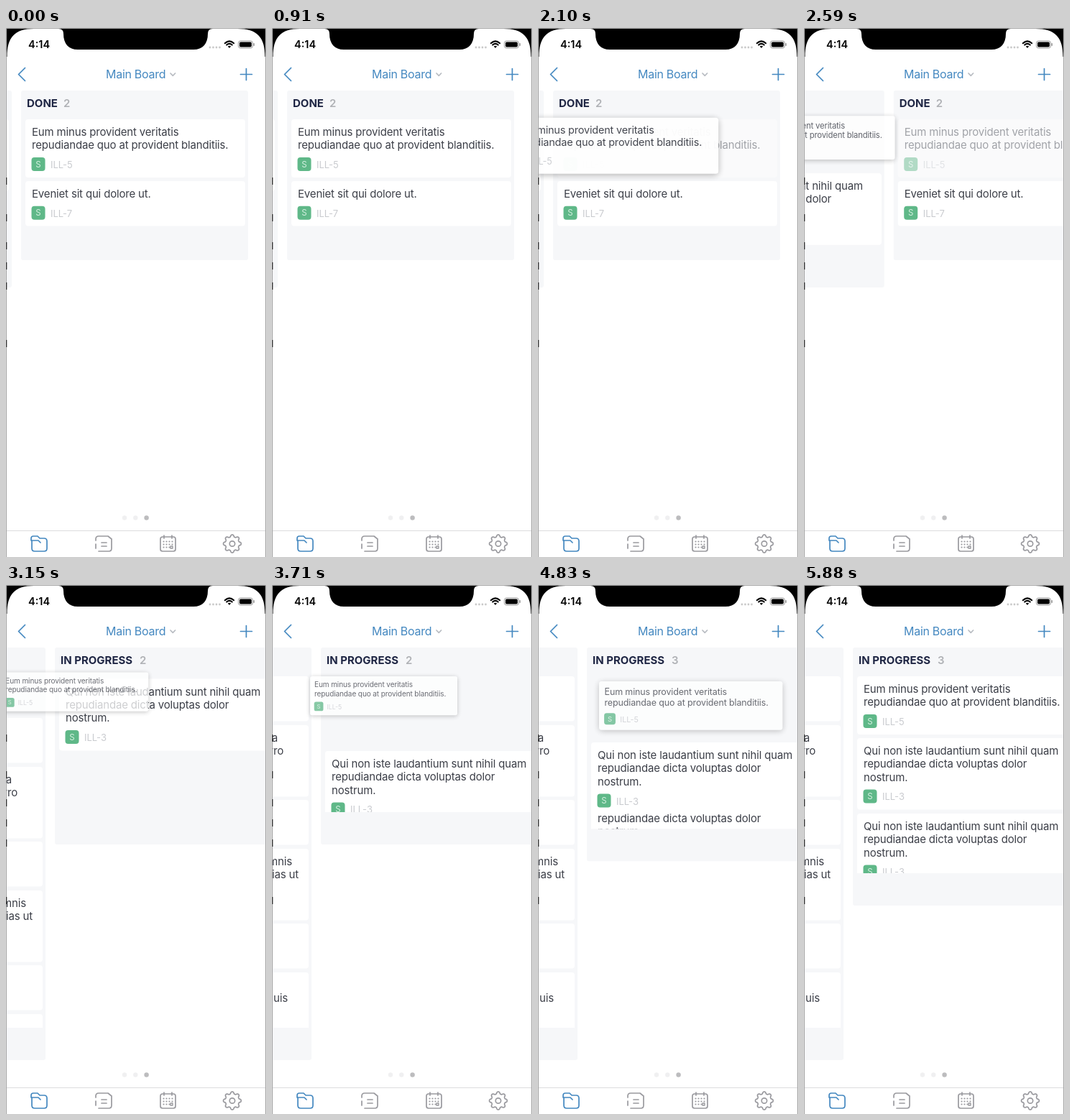
An HTML page for the animation above (5.95 s loop, 362 px wide and 736 px high).

```html
<!DOCTYPE html>
<html lang="en">
<head>
<meta charset="utf-8">
<title>Board</title>
<style>
  html, body { margin: 0; width: 100%; height: 100%; overflow: hidden; background: #fff; }
  svg { display: block; }
  text { font-family: Inter, "Liberation Sans", sans-serif; white-space: pre; }
  .body { font-size: 15px; letter-spacing: -.17px; fill: #3c3f48; }
  .key { font-size: 13px; fill: #c9cbcf; }
  .badge { font-size: 11.5px; fill: #d3efdf; text-anchor: middle; }
  .head { font-size: 15px; font-weight: 700; fill: #1f2644; }
  .count { font-size: 15px; font-weight: 600; fill: #b0b2b6; }
  .title { font-size: 16px; letter-spacing: -.28px; fill: #4488c0; }
  .clock { font-size: 14.5px; font-weight: 600; }
  .line { fill: none; stroke-linecap: round; stroke-linejoin: round; }
</style>
</head>
<body>
<svg id="stage" width="362" height="736" viewBox="0 0 362 736"></svg>
<script>
const LOOP = 5950, STEP = 70, PITCH = 329, TOP = 127, INSET = 6;
const BLUE = '#4488c0', GRAY = '#9a9a9f';
const stage = document.getElementById('stage');

const rect = (x, y, w, h, fill, rx = 0, extra = '') =>
  `<rect x="${x}" y="${y}" width="${w}" height="${h}" rx="${rx}" fill="${fill}" ${extra}/>`;
const dot = (x, y, r, fill) => `<circle cx="${x}" cy="${y}" r="${r}" fill="${fill}"/>`;
const text = (x, y, cls, str, extra = '') => `<text x="${x}" y="${y}" class="${cls}" ${extra}>${str}</text>`;
const line = (d, color, width = 1.7) => `<path class="line" d="${d}" stroke="${color}" stroke-width="${width}"/>`;
const at = (x, y, body) => `<g transform="translate(${x} ${y})">${body}</g>`;
const cardHeight = rows => 44 + 18.5 * rows;

function card(lines, key) {
  const rows = lines.length, y = 16.5 + 18.3 * rows;
  return rect(0, 0, 306, cardHeight(rows), '#fff', 4) +
    lines.map((s, i) => text(9, 23 + 18.3 * i, 'body', s)).join('') +
    rect(8.5, y, 19, 19, '#5fb888', 4) + text(18, y + 13.5, 'badge', 'S') +
    text(35, y + 15, 'key', key);
}

// Only the line ends of the leftmost column reach the screen: one-row and three-row cards alternate.
function tailCards() {
  const tails = [['culpa', 263, 'porro', 271], ['omnis', 283, 'alias ut', 292], ['', 0, 'quis', 277]];
  const tail = (s, end, i) => text(end, 23 + 18.3 * i, 'body', s, 'text-anchor="end"');
  return tails.map(([a, endA, b, endB], n) => at(INSET, TOP + 172 * n,
    rect(0, 0, 306, cardHeight(1), '#fff', 4) +
    at(0, 68, rect(0, 0, 306, cardHeight(3), '#fff', 4) + tail(a, endA, 0) + tail(b, endB, 1)))).join('');
}

function column(id, bottom, title, countX, cards) {
  return `<g id="${id}">` + rect(0, 87, 316, bottom - 87, '#f6f7f9', 3, `id="${id}Back"`) +
    text(8, 110, 'head', title) + text(countX, 110, 'count', title && 2, `id="${id}Count"`) +
    `<clipPath id="${id}Clip">${rect(0, 124, 316, bottom - 169, '#000', 0, `id="${id}Window"`)}</clipPath>` +
    `<g clip-path="url(#${id}Clip)">${cards}</g></g>`;
}

function gear(cx, cy) {
  const points = Array.from({ length: 96 }, (_, i) => {
    const a = i / 48 * Math.PI, r = 11 + 1.5 * Math.tanh(1.6 * Math.cos(8 * a));
    return [cx + r * Math.cos(a), cy + r * Math.sin(a)].map(v => v.toFixed(2)).join(' ');
  });
  return line(`M${points.join('L')}Z`, GRAY) +
    `<circle cx="${cx}" cy="${cy}" r="3.7" fill="none" stroke="${GRAY}" stroke-width="1.7"/>`;
}

function tabBar() {
  const days = Array.from({ length: 11 }, (_, i) => dot(219.5 + i % 4 * 4, 714.5 + (i >> 2) * 4, 1.1, GRAY)).join('');
  return rect(0, 699, 362, 37, '#fff') + rect(0, 699, 362, 1, '#dcdcde') +
    line('M35 713V710Q35 707 38 707H44L47 710H53Q57 710 57 714V724Q57 728 53 728H40Q36 728 36 724V713H45L48 716', BLUE) +
    line('M125 713V711Q125 707 129 707H142L147 711V724Q147 728 143 728H129M125 718V724M133 716H140M133 721H140', GRAY) +
    line('M218 708H233Q236 708 236 711V725Q236 728 233 728H218Q215 728 215 725V711Q215 708 218 708M220 706V710M231 706V710', GRAY) +
    days + line('M229 721H232V724H229Z', GRAY, 1.4) + gear(315, 717.5);
}

function statusBar() {
  const bezel = '<path d="M0 0H362V40H360.5C360.5 13 350 1 322 1H288Q281 1 281 8C281 22 274 30 261 30H100C87 30 80 22 80 8Q80 1 73 1H39C12 1 1.5 13 1.5 40H0Z"/>';
  const signal = [0, 1, 2, 3].map(i => dot(284 + 4.5 * i, 27, 1.4, '#c9c9c9')).join('');
  const wifi = line('M304.8 21.2Q311 15.5 317.2 21.2M307.2 23.6Q311 20.2 314.8 23.6', '#000', 2) +
    '<path d="M308.8 25.6Q311 23.8 313.2 25.6L311 28Z"/>';
  const battery = '<rect x="323.5" y="18" width="20" height="10" rx="3" fill="none" stroke="#999"/>' +
    rect(325, 19.5, 17, 7, '#000', 1.7) + rect(344.5, 21, 1.5, 4, '#999', .7);
  return bezel + text(31, 28, 'clock', '4:14') + signal + wifi + battery;
}

function chrome() {
  const pages = [0, 1, 2].map(i => dot(165 + 15.3 * i, 681.5, 3.2, i < 2 ? '#f0f0f1' : '#bcbcbe')).join('');
  const specks = [213, 264, 303, 331, 359, 439].map(y => rect(0, y - 5, 1.3, 10, '#333')).join('');
  const nav = line('M26.5 55.5L17.5 64.5L26.5 73.5', BLUE) + text(139, 70, 'title', 'Main Board') +
    line('M229 63L232.3 66.3L235.6 63', '#b8bcc2') + line('M326.5 64.5H342.5M334.5 56.5V72.5', BLUE);
  const frame = rect(.5, .5, 361, 740, 'none', 0, 'stroke="#a8a8a8"');
  return pages + tabBar() + statusBar() + frame + specks + nav;
}

const eum = card(['Eum minus provident veritatis', 'repudiandae quo at provident blanditiis.'], 'ILL-5');
const qui = card(['Qui non iste laudantium sunt nihil quam', 'repudiandae dicta voluptas dolor', 'nostrum.'], 'ILL-3');
const eveniet = card(['Eveniet sit qui dolore ut.'], 'ILL-7');

stage.innerHTML =
  '<filter id="blur" x="-20%" y="-40%" width="140%" height="190%"><feGaussianBlur stdDeviation="5"/></filter>' +
  column('todo', 661, '', 0, `<g id="todoList">${tailCards()}</g>`) +
  column('doing', 361, 'IN PROGRESS', 118, `<g id="second">${qui}</g><g id="first">${qui}</g>`) +
  column('done', 323, 'DONE', 59, at(INSET, TOP, `<g opacity=".45">${eum}</g>`) + at(INSET, 213, eveniet)) +
  `<g id="drag">${rect(0, 2, 306, 81, '#000', 5, 'id="shadow" filter="url(#blur)"')}${eum}</g>` +
  chrome();

const el = {};
stage.querySelectorAll('[id]').forEach(node => el[node.id] = node);

function move(node, x, y, scale = 1) {
  node.setAttribute('transform', `translate(${x} ${y}) scale(${scale})`);
}

function render(t) {
  // Eased progress of one phase, from 0 to 1.
  const phase = (start, duration) => {
    const u = Math.min(1, Math.max(0, (t - start) / duration));
    return u * u * (3 - 2 * u);
  };
  const lift = phase(1330, 280), shrink = phase(1750, 1200);
  const hover = phase(3780, 800), drop = phase(4690, 280), settle = phase(4690, 230);

  const x = 21 + 376 * phase(2310, 810);
  move(el.done, x, 0);
  move(el.doing, x - PITCH, 0);
  move(el.todo, x - 2 * PITCH, 0);

  // Lists open a gap under the dragged card and close it again.
  move(el.todoList, 0, 58 * (phase(2800, 280) - phase(3220, 280)));
  const firstY = TOP + 86 * (phase(2380, 270) - phase(2940, 240)) + 104 * phase(3220, 280) - 18 * settle;
  move(el.first, INSET, firstY);
  move(el.second, INSET, firstY + 105 * settle);

  const bottom = 361 + 85 * phase(4690, 406);
  el.doingBack.setAttribute('height', bottom - 87);
  el.doingWindow.setAttribute('height', bottom - 169);
  el.doingCount.textContent = t < 4690 ? 2 : 3;

  move(el.drag,
    27 - 5.5 * lift - 130.5 * phase(1750, 700) + 162 * phase(2450, 1190) + 43 * hover - 22 * drop,
    TOP - 1.5 * lift - 4 * shrink + 5.5 * phase(3150, 490) + 14 * hover - 14 * drop,
    1 + .04 * lift - .37 * shrink + .33 * drop);
  el.drag.setAttribute('opacity', 1 - .25 * shrink + .25 * phase(4830, 280));
  el.shadow.setAttribute('opacity', .3 * (lift - phase(4830, 280)));
}

function frame() {
  const t = performance.now() % LOOP;
  render(Math.floor(t / STEP) * STEP);
  requestAnimationFrame(frame);
}
frame();
</script>
</body>
</html>
```
